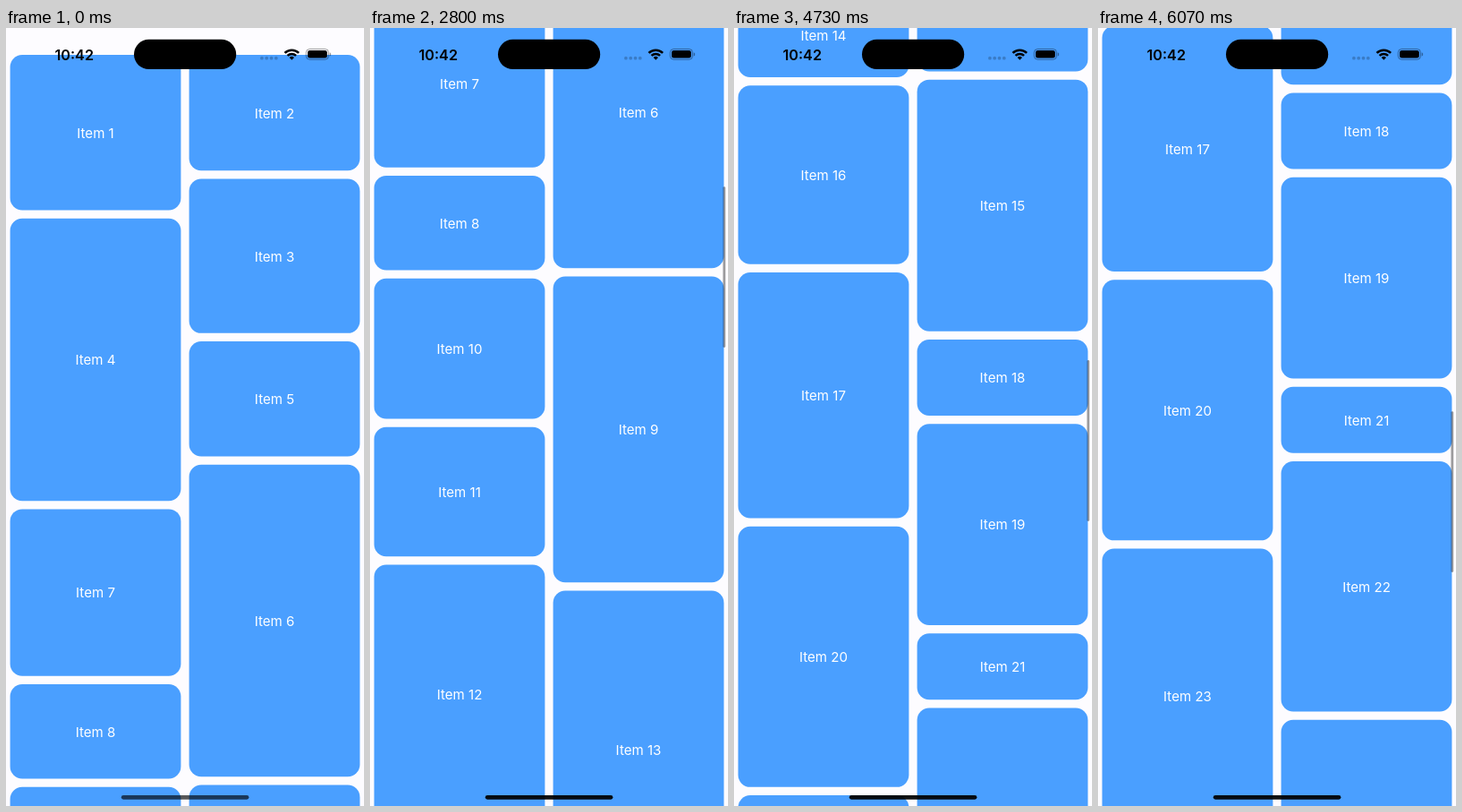
These frames come from a looping animation (400 px wide and 869 px high, 6140 ms). An HTML page with a canvas:

```html
<!DOCTYPE html>
<html lang="en">
<head>
<meta charset="utf-8">
<title>Masonry scroll</title>
<style>
  html, body { margin: 0; width: 100%; height: 100%; overflow: hidden; background: #fdfcff; }
  canvas { display: block; width: 400px; height: 869px; }
</style>
</head>
<body>
<canvas id="stage"></canvas>
<script>
const W = 400, H = 869, LOOP = 6140, FPS = 15;
const FONT = 'Inter, Roboto, "Liberation Sans", sans-serif';
const GAP = 9.25, TOP = 30, ITEM_W = 190.8;

const canvas = document.getElementById('stage');
const ctx = canvas.getContext('2d');
const ratio = window.devicePixelRatio || 1;
canvas.width = Math.round(W * ratio);
canvas.height = Math.round(H * ratio);
ctx.scale(canvas.width / W, canvas.height / H);

// Each column: [item number, height]
const columns = [
  { x: 4.6, items: [[1, 173.5], [4, 315.4], [7, 186.3], [8, 105.5], [10, 156.8], [11, 144.5],
    [12, 288.6], [14, 93.6], [16, 199.5], [17, 274.5], [20, 291.1], [23, 328]] },
  { x: 204.6, items: [[2, 129.3], [3, 172.3], [5, 128.4], [6, 348.5], [9, 341.8], [13, 355.8],
    [15, 281.1], [18, 85], [19, 224.7], [21, 74.1], [22, 279.5], [24, 300]] }
];

const tiles = columns.flatMap(({ x, items }) => {
  let y = TOP;
  return items.map(([n, h]) => {
    const tile = { x, y, h, label: 'Item ' + n };
    y += h + GAP;
    return tile;
  });
});

// Motion curves take elapsed and total ticks; a glide decays towards its target.
const linear = (t, d) => t / d;
const easeIn = (t, d) => (t / d) ** 2;
const easeOut = (t, d) => 1 - (1 - t / d) ** 2;
const glide = t => 1 - Math.exp(-t / 7.5);

// [start tick, end tick, from, to, curve]
const moves = [
  [21, 25, 0, 92, easeOut],
  [27, 28, 92, 100.5, linear],
  [28, 38, 100.5, 713.6, glide],
  [41, 42, 552, 568, linear],
  [42, 44, 568, 727, linear],
  [44, 54, 727, 1073.5, glide],
  [54, 56, 982, 1140, linear],
  [56, 61, 1140, 1595, glide],
  [61, 65, 1361.4, 1367, linear],
  [66, 69, 1367, 1413.5, easeIn],
  [69, 92, 1413.5, 1800, glide]
];

function scrollAt(tick) {
  let y = 0;
  for (const [start, end, from, to, curve] of moves) {
    if (tick < start) break;
    y = from + (to - from) * curve(Math.min(tick, end) - start, end - start);
  }
  return y;
}

function pill(x, y, w, h, r, color) {
  ctx.fillStyle = color;
  ctx.beginPath();
  ctx.roundRect(x, y, w, h, r);
  ctx.fill();
}

function text(str, x, y, font) {
  ctx.font = font + ' ' + FONT;
  ctx.textAlign = 'center';
  ctx.fillText(str, x, y);
}

function drawTiles(scroll) {
  for (const { x, y, h, label } of tiles) {
    const top = y - scroll;
    if (top > H || top + h < 0) continue;
    pill(x, top, ITEM_W, h, 13.5, '#4a9fff');
    ctx.fillStyle = '#fff';
    text(label, x + ITEM_W / 2, top + h / 2 + 5.9, '400 15.1px');
  }
}

function drawWifi(x, y) {
  const mid = -Math.PI / 2, half = 0.78;
  ctx.strokeStyle = ctx.fillStyle = '#000';
  for (const [r, width] of [[11.1, 2.6], [6.8, 2.5]]) {
    ctx.lineWidth = width;
    ctx.beginPath();
    ctx.arc(x, y, r, mid - half, mid + half);
    ctx.stroke();
  }
  ctx.beginPath();
  ctx.moveTo(x, y);
  ctx.arc(x, y, 3.8, mid - half, mid + half);
  ctx.fill();
}

function drawBattery() {
  const faint = 'rgba(0,0,0,0.38)';
  ctx.strokeStyle = faint;
  ctx.lineWidth = 1;
  ctx.beginPath();
  ctx.roundRect(335.3, 23.5, 25.2, 11.7, 4);
  ctx.stroke();
  pill(361.7, 27.4, 1.4, 4, [0, 1.4, 1.4, 0], faint);
  pill(337, 25.1, 21.8, 8.5, 2.5, '#000');
}

function drawStatus() {
  ctx.fillStyle = '#000';
  text('10:42', 76.2, 35.6, '600 16.2px');
  pill(143, 12.8, 114.2, 33.3, 16.65, '#000');
  for (let i = 0; i < 4; i++) pill(284 + i * 5.3, 31.8, 3.8, 3.8, 1.9, 'rgba(0,0,0,0.22)');
  drawWifi(319.3, 35.8);
  drawBattery();
}

function draw(tick) {
  const scroll = scrollAt(tick);
  ctx.fillStyle = '#fdfcff';
  ctx.fillRect(0, 0, W, H);
  drawTiles(scroll);
  if (scroll > 0) pill(394.4, 59.5 + scroll * 0.2072, 2.8, 179.8, 1.4, 'rgba(0,0,0,0.38)');
  drawStatus();
  const wake = Math.min(1, Math.max(0, (tick - 21) / 4));
  pill(128.8, 857, 142.6, 4.7, 2.35, `rgba(0,0,0,${0.65 + 0.28 * wake})`);
}

const begin = performance.now();
function loop() {
  const ms = (performance.now() - begin) % LOOP;
  draw(Math.floor((ms + 4) * FPS / 1000));
  requestAnimationFrame(loop);
}
loop();
</script>
</body>
</html>
```
